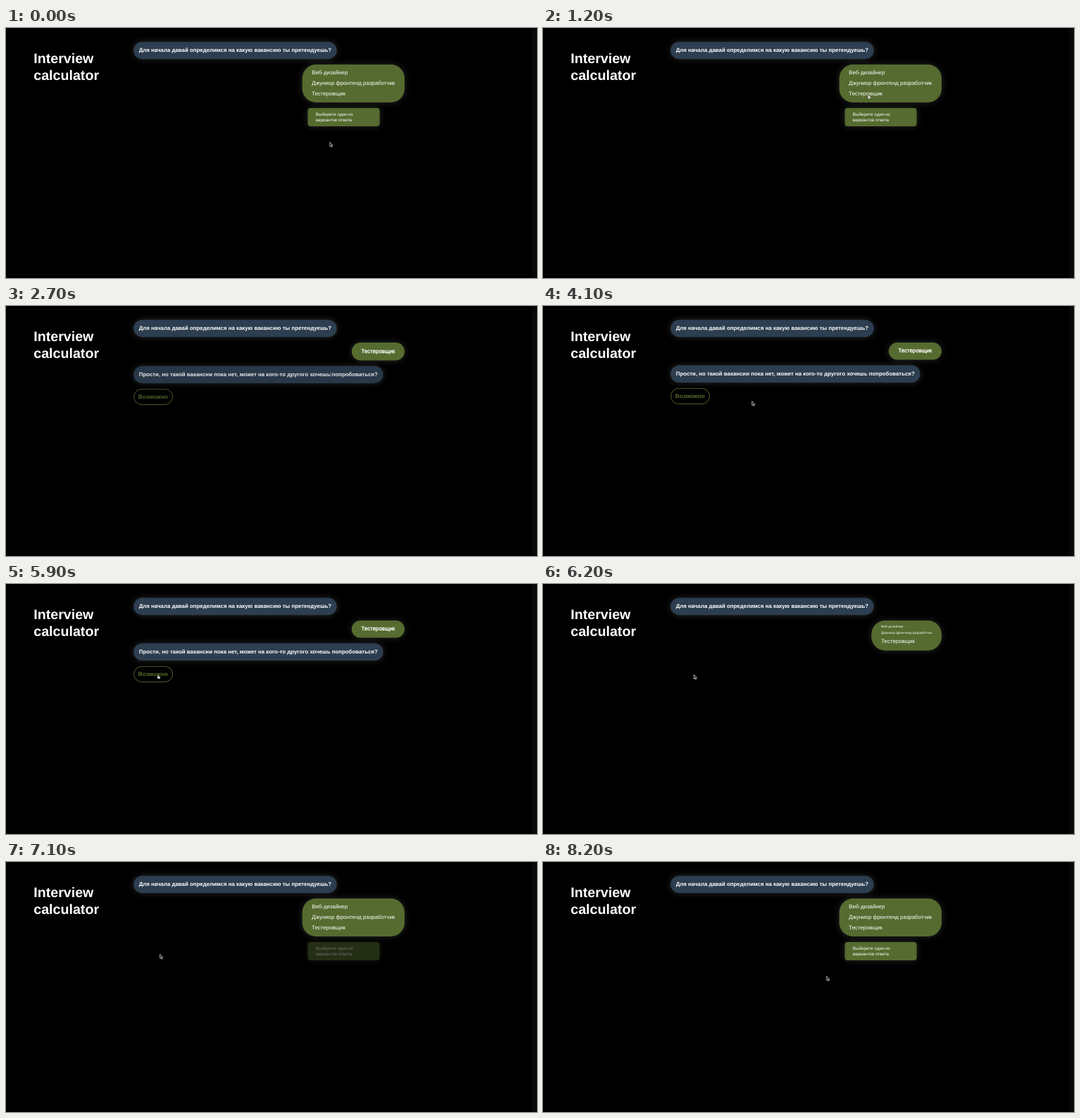
Write an HTML page that moves like this. It is 754 px wide and 356 px high and loops after 8.4 s.

```html
<!DOCTYPE html>
<html lang="ru">
<head>
<meta charset="utf-8">
<title>Interview calculator</title>
<style>
  :root { --blue: #2c3e50; --green: #556b2f; --loop: 8400ms; }
  html, body { margin: 0; width: 100%; height: 100%; overflow: hidden; background: #000; }

  /* The page is laid out 1536px wide and shown at the stage width of 754px. */
  .page {
    position: absolute; left: 0; top: 0; width: 1536px; height: 726px;
    transform: scale(.49089); transform-origin: 0 0;
    font: 16px/18px "Liberation Sans", Arial, sans-serif; color: #fff;
    text-rendering: geometricPrecision; white-space: nowrap;
  }
  .scrollbar { position: absolute; right: 0; top: 0; width: 15px; height: 100%; background: #080808; }
  h1 { position: absolute; left: 80px; top: 65px; margin: 0; font-size: 40px; line-height: 48px; }

  .chat {
    position: absolute; left: 368.5px; top: 40px; width: 784.5px;
    display: flex; flex-direction: column; align-items: flex-start; gap: 16px;
  }
  .bubble, .options, .toast { box-shadow: 0 0 20px rgba(255, 255, 255, .16); }
  .bubble { padding: 16px; border-radius: 40px; background: var(--blue); font-weight: bold; }

  .options {
    align-self: flex-end; margin: 0; padding: 10px 28px; list-style: none;
    border-radius: 40px; background: var(--green);
  }
  .options li { display: flex; align-items: center; height: 30px; }
  .other { animation: collapse var(--loop) infinite, other-fade var(--loop) infinite linear; }
  .chosen { animation: chosen var(--loop) infinite step-end; }

  .reply { animation: reply var(--loop) infinite linear; }
  .again {
    box-sizing: border-box; width: 114px; height: 47px; border: 2px solid var(--green);
    border-radius: 24px; font-weight: bold; font-size: 17px; line-height: 43px;
    text-align: center; color: var(--green);
  }
  .toast {
    position: absolute; left: 873px; top: 232px; box-sizing: border-box; width: 208px; height: 53px;
    padding: 12px 23px; border-radius: 8px; background: var(--green);
    font-size: 12.8px; line-height: 14.5px; animation: toast var(--loop) infinite linear;
  }

  .cursor { position: absolute; left: 0; top: 0; overflow: visible; animation: move var(--loop) infinite ease-in-out; }
  .arrow { animation: arrow var(--loop) infinite step-end; }
  .hand { animation: hand var(--loop) infinite step-end; }
  .beam { animation: beam var(--loop) infinite step-end; }

  @keyframes collapse {
    0%, 24.5% { font-size: 16px; height: 30px; }
    24.51%, 25% { font-size: 11.7px; height: 23px; animation-timing-function: ease-out; }
    33.33%, 70.24% { font-size: 0; height: 0; animation-timing-function: ease; }
    80.36%, 100% { font-size: 16px; height: 30px; }
  }
  @keyframes other-fade {
    0%, 24.5% { opacity: 1; }
    24.51%, 70.3% { opacity: 0; }
    74%, 100% { opacity: 1; }
  }
  @keyframes chosen {
    0%, 71%, 100% { -webkit-text-stroke: 0 #fff; }
    24.5% { -webkit-text-stroke: .6px #fff; }
  }
  @keyframes reply {
    0%, 25% { opacity: 0; }
    32.8%, 70.8% { opacity: 1; }
    70.81%, 100% { opacity: 0; }
  }
  @keyframes toast {
    0%, 24.5% { opacity: 1; }
    24.51%, 80.36% { opacity: 0; }
    90%, 100% { opacity: 1; }
  }
  @keyframes move {
    0%, .6% { transform: translate(459.8px, 162.5px); }
    9.52%, 39.88% { transform: translate(460.5px, 94.5px); }
    45.83% { transform: translate(291px, 137.5px); }
    48.2%, 52.98% { transform: translate(296.7px, 135.5px); }
    59.5% { transform: translate(203px, 130px); }
    62.5%, 80.36% { transform: translate(214.2px, 129px); }
    90.48%, 91.07% { transform: translate(226.5px, 135.5px); }
    97.62%, 100% { transform: translate(402.7px, 162.5px); }
  }
  @keyframes arrow {
    0%, 24.5%, 41%, 71%, 100% { opacity: 1; }
    8.6%, 28%, 57.5% { opacity: 0; }
  }
  @keyframes hand {
    0%, 24.5%, 71%, 100% { opacity: 0; }
    8.6%, 57.5% { opacity: 1; }
  }
  @keyframes beam {
    0%, 41%, 100% { opacity: 0; }
    28% { opacity: 1; }
  }
</style>
</head>
<body>
<div class="page">
  <div class="scrollbar"></div>
  <h1>Interview<br>calculator</h1>
  <div class="chat">
    <div class="bubble">Для начала давай определимся на какую вакансию ты претендуешь?</div>
    <ul class="options">
      <li class="other">Веб-дизайнер</li>
      <li class="other">Джуниор фронтенд разработчик</li>
      <li class="chosen">Тестеровщик</li>
    </ul>
    <div class="bubble reply">Прости, но такой вакансии пока нет, может на кого-то другого хочешь попробоваться?</div>
    <div class="again reply">Возможно</div>
  </div>
  <div class="toast">Выберите один из<br>вариантов ответа</div>
</div>
<svg class="cursor" width="8" height="10" stroke-linejoin="round">
  <path class="arrow" d="M0 0V6L1.4 4.8 2.4 7 3.3 6.6 2.4 4.5H4.2Z" fill="#000" stroke="#fff" stroke-width=".7"/>
  <path class="hand" d="M1 .6V3.4L.2 3.2 1.6 6H4.2L4.8 3 2.2 2.3V.6Z" fill="#fff" stroke="#222" stroke-width=".4"/>
  <path class="beam" d="M.8 0V5.6" fill="none" stroke="#cdd3d8" stroke-width=".6"/>
</svg>
</body>
</html>
```
